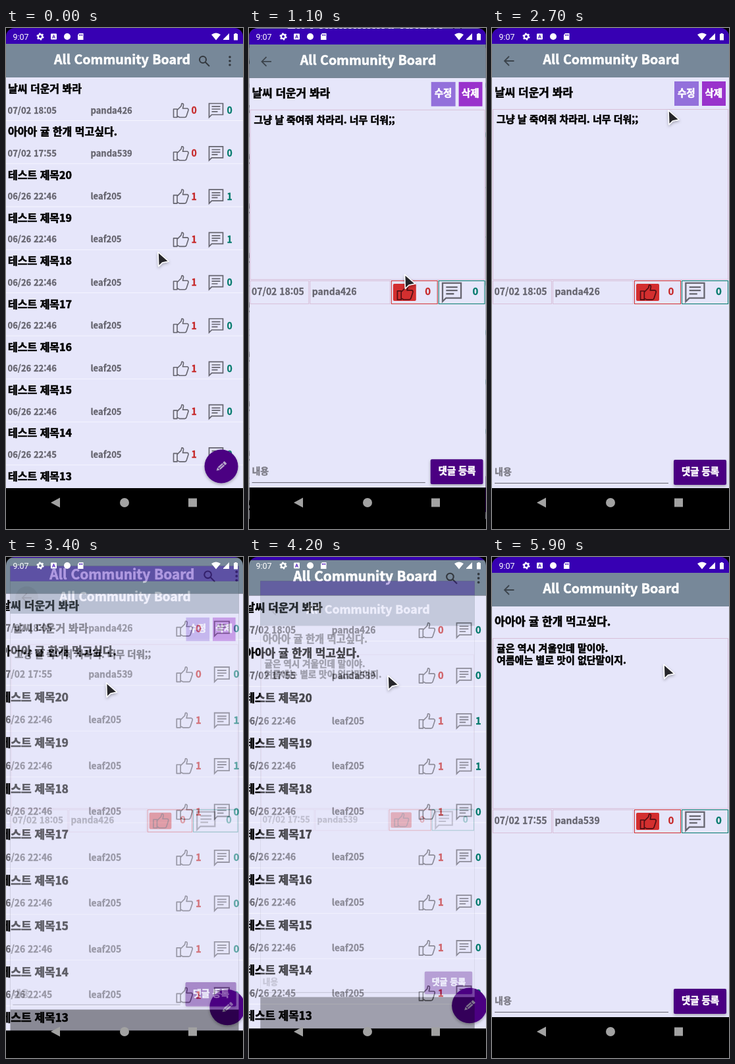
Animation, 360 px wide and 760 px high, one loop 6000 ms. Source, as an HTML page:

```html
<!DOCTYPE html>
<html lang="ko">
<head>
<meta charset="utf-8">
<title>Community board</title>
<style>
html, body { margin: 0; width: 100%; height: 100%; overflow: hidden; background: #000; }
svg { display: block; width: 360px; height: 760px; }
text { font-family: "Noto Sans CJK KR", "Noto Sans CJK", "Noto Sans", sans-serif; font-weight: 700; white-space: pre; stroke-width: .3; }
.heavy { font-weight: 900; stroke-width: .6; }
.clock { font-family: Roboto, sans-serif; font-weight: 400; }
</style>
</head>
<body>
<svg id="stage" viewBox="0 0 360 760">
  <defs>
    <clipPath id="screen"><rect width="360" height="780" rx="13"/></clipPath>
    <filter id="shadow" x="-30%" y="-30%" width="160%" height="180%">
      <feDropShadow dx="0" dy="2" stdDeviation="2" flood-opacity=".3"/>
    </filter>
    <path id="thumb" fill="none" stroke-width="1.6" stroke-linejoin="round"
      d="M1 10H6.5V22.5H1ZM6.5 11.5L12.5 5.5L13.5 1.5Q16.5 1 16 4.5L15 9H22Q24 9.5 23.4 12L20.6 20.5Q20 22.5 18 22.5H10L6.5 20.5"/>
    <path id="bubble" fill="none" stroke="#66656f" stroke-width="1.7"
      d="M1 1H22V18H5L1 22ZM5 5.7H18M5 9.5H18M5 13.3H14"/>
  </defs>
  <g id="windows" clip-path="url(#screen)"></g>
  <g fill="#fff">
    <text class="clock" x="10.5" y="17.5" font-size="12.5">9:07</text>
    <circle cx="52" cy="13" r="3.2" fill="none" stroke="#fff" stroke-width="2.4"/>
    <circle cx="52" cy="13" r="4.8" fill="none" stroke="#fff" stroke-width="1.6" stroke-dasharray="2.4 2.63"/>
    <rect x="68" y="8.5" width="9" height="9" rx="1"/>
    <path d="M70.5 15.5L72.5 10.5L74.5 15.5M71.2 14H73.8" fill="none" stroke="#3700b3"/>
    <circle cx="93" cy="13" r="5"/>
    <path d="M111 8H117.5V18H109V10.5ZM312 10Q319 5 326 10L319 18.5ZM330 18V17L339 8V18ZM346 9H347.5V8H350.5V9H352V18.5H346Z"/>
    <path d="M111.5 9.5V12M113.5 9.5V12M115.5 9.5V12" stroke="#3700b3"/>
  </g>
  <g fill="#a2a2a2">
    <path d="M68 720L82 712.5V727.5Z"/>
    <circle cx="180" cy="720" r="7"/>
    <rect x="277" y="713.5" width="13" height="13"/>
  </g>
  <path id="cursor" d="M0 0L.8 21.5L6.5 16L16 14Z" fill="#26262c" stroke="#fff" stroke-width="1.6" stroke-linejoin="round" filter="url(#shadow)"/>
</svg>
<script>
const LOOP = 6000, TICK = 100, SLIDE = 400;
const RED = '#c62828', TEAL = '#00796b', GRAY = '#66656f', INDIGO = '#4b0082';

const text = (x, y, size, str, fill = '#000', cls = '') =>
  `<text x="${x}" y="${y}" font-size="${size}" fill="${fill}" stroke="${fill}" class="${cls}">${str}</text>`;
const rect = (x, y, w, h, fill, extra = '') =>
  `<rect x="${x}" y="${y}" width="${w}" height="${h}" fill="${fill}" ${extra}/>`;
const frame = (x, y, w, h, color) => rect(x + .5, y + .5, w, h, 'none', `stroke="${color}"`);
const icon = (id, x, y, scale = 1, stroke = GRAY) =>
  `<use href="#${id}" stroke="${stroke}" transform="translate(${x} ${y}) scale(${scale})"/>`;

const shell = titleX => rect(0, 0, 360, 760, '#000') + rect(0, 0, 360, 24, '#3700b3') +
  rect(0, 24, 360, 51, '#778899') + rect(0, 75, 360, 623, '#e6e6fa') +
  text(titleX, 55, 19.6, 'All Community Board', '#fff', 'heavy');

const posts = [
  { title: '날씨 더운거 봐라', date: '07/02 18:05', user: 'panda426', own: true,
    body: ['그냥 날 죽여줘 차라리. 너무 더워;;'] },
  { title: '아아아 귤 한개 먹고싶다.', date: '07/02 17:55', user: 'panda539',
    body: ['귤은 역시 겨울인데 말이야.', '여름에는 별로 맛이 없단말이지.'] }
];
for (let n = 20; n > 12; n--)
  posts.push({ title: `테스트 제목${n}`, date: `06/26 22:4${n > 14 ? 6 : 5}`, user: 'leaf205', likes: 1, replies: n > 18 ? 1 : 0 });

function listRow(post, i) {
  const y = 75 + 65.3 * i;
  const meta = text(2.5, y + 54.5, 13, post.date, GRAY) + text(128.5, y + 54.5, 13, post.user, GRAY) +
    icon('thumb', 253.5, y + 38) + text(281.5, y + 55, 14, post.likes || 0, RED) +
    icon('bubble', 307.5, y + 38.5) + text(335.5, y + 55, 14, post.replies || 0, TEAL) +
    rect(0, y + 65, 360, 1, '#f6f6ff');
  return text(3, y + 23, 16, post.title, '#000', 'heavy') + (i < 9 ? meta : '');
}

const listView = shell(73) + posts.map(listRow).join('') +
  `<g fill="none" stroke="#33383e" stroke-width="2"><circle cx="299" cy="48" r="5"/><path d="M302.5 51.5L309 58"/></g>
   <g fill="#33383e">${[44, 50, 56].map(y => `<circle cx="340" cy="${y}" r="1.8"/>`).join('')}</g>
   <circle cx="327" cy="665" r="25.5" fill="${INDIGO}" filter="url(#shadow)"/>
   <g transform="translate(327 665) rotate(-42) scale(.9)" fill="#b5a6c8">
     <path d="M-11 0L-6 -3V3Z"/>${rect(-5, -3, 10, 2.5, '#b5a6c8') + rect(-5, .5, 10, 2.5, '#b5a6c8') + rect(6, -3, 4, 6, '#b5a6c8', 'rx="1"')}
   </g>`;

const detailView = post => shell(77.5) +
  `<circle class="ripple" cx="26" cy="50" r="18" fill="#000" opacity="0"/>
   <path d="M33.5 50H19.5M26 43L19 50L26 57" fill="none" stroke="#3c444c" stroke-width="1.8"/>` +
  text(4, 104, 17, post.title, '#000', 'heavy') +
  (post.own ? rect(277, 81, 37, 37, '#9370db') + text(282, 103.5, 14.5, '수정', '#fff', 'heavy') +
    rect(319, 81, 36, 37, '#9932cc') + text(323.5, 103.5, 14.5, '삭제', '#fff', 'heavy') : '') +
  frame(1, 123, 357, 258, '#d8bfd8') +
  post.body.map((line, i) => text(7, 144 + 18 * i, 15, line, '#000', 'heavy')).join('') +
  frame(1, 383, 89, 35, '#d8bfd8') + text(3.5, 405, 14, post.date, GRAY) +
  frame(92, 383, 122, 35, '#d8bfd8') + text(95.5, 405, 14, post.user, GRAY) +
  frame(216, 383, 70, 35, '#d32f2f') + rect(219, 388, 35, 26, '#d32f2f', 'rx="2"') +
  icon('thumb', 224.5, 388.5, 1.05, '#501014') + text(267.5, 405, 15, 0, RED) +
  frame(288, 383, 70, 35, TEAL) + icon('bubble', 293, 385.5, 1.34) + text(340, 405, 15, 0, TEAL) +
  text(4, 677.5, 14, '내용', '#7a7983') + rect(4, 690, 264, 1, GRAY) +
  rect(276, 655, 80, 38, INDIGO, 'rx="2" filter="url(#shadow)"') + text(288, 678, 14.4, '댓글 등록', '#fff', 'heavy');

const windows = document.getElementById('windows');
const cursor = document.getElementById('cursor');
windows.innerHTML = [listView, detailView(posts[0]), detailView(posts[1])].map(v => `<g>${v}</g>`).join('');
const [list, ...details] = windows.children;
const ripple = details[0].querySelector('.ripple');

const clamp = v => Math.min(1, Math.max(0, v));
const mix = (a, b, k) => a + (b - a) * k;
const bezier = (a, b, c, d, u) => a * (1 - u) ** 3 + 3 * b * u * (1 - u) ** 2 + 3 * c * u * u * (1 - u) + d * u ** 3;

// Fast start, very slow finish: two joined cubic curves.
function slideEase(x) {
  const [xs, ys] = x < 1 / 6
    ? [[0, .05, .1333, 1 / 6], [0, 0, .06, .4]]
    : [[1 / 6, .2083, .25, 1], [.4, .82, 1, 1]];
  let low = 0, high = 1;
  for (let i = 0; i < 24; i++) {
    const mid = (low + high) / 2;
    if (bezier(...xs, mid) < x) low = mid; else high = mid;
  }
  return bezier(...ys, low);
}

const slides = [
  { start: 840, view: 0, open: true },
  { start: 3335, view: 0, open: false },
  { start: 4135, view: 1, open: true }
];

// time, x, y of the pointer tip
const path = [
  [0, 231, 340], [600, 214, 112], [800, 214, 112], [1100, 236.5, 374], [1500, 240, 392],
  [1900, 308, 394], [2300, 296, 112], [2700, 268, 125], [2850, 268, 125], [3150, 27, 50], [3300, 27, 50],
  [3400, 152.5, 191], [3600, 211, 180], [4250, 211, 180], [4600, 299, 133],
  [5100, 299, 133], [5600, 290, 110], [5900, 261, 163], [6000, 261, 163]
];

function place(el, scale, alpha) {
  el.setAttribute('transform', `translate(180 380) scale(${scale}) translate(-180 -380)`);
  el.setAttribute('opacity', alpha);
  el.style.display = alpha > 0 ? '' : 'none';
}

function render(t) {
  place(list, 1, 1);
  details.forEach(d => place(d, 1, 0));
  const slide = slides.filter(s => t >= s.start).pop();
  if (slide) {
    const age = t - slide.start, k = slideEase(clamp(age / SLIDE)), detail = details[slide.view];
    if (slide.open) {
      place(list, mix(1, 1.15, k), 1);
      place(detail, mix(.85, 1, k), clamp((age - 50) / 50));
    } else {
      place(list, mix(1.1, 1, k), 1);
      place(detail, mix(1, .9, k), clamp(1 - (age - 35) / 50));
    }
  }
  ripple.setAttribute('opacity', t >= 3200 && t < 3500 ? .14 : 0);

  const i = path.findIndex(p => p[0] > t);
  const [t0, x0, y0] = path[i - 1], [t1, x1, y1] = path[i];
  const u = (t - t0) / (t1 - t0), k = u * u * (3 - 2 * u);
  cursor.setAttribute('transform', `translate(${mix(x0, x1, k)} ${mix(y0, y1, k)})`);
}

function loop() {
  render(Math.floor(performance.now() % LOOP / TICK) * TICK);
  requestAnimationFrame(loop);
}
loop();
</script>
</body>
</html>
```
